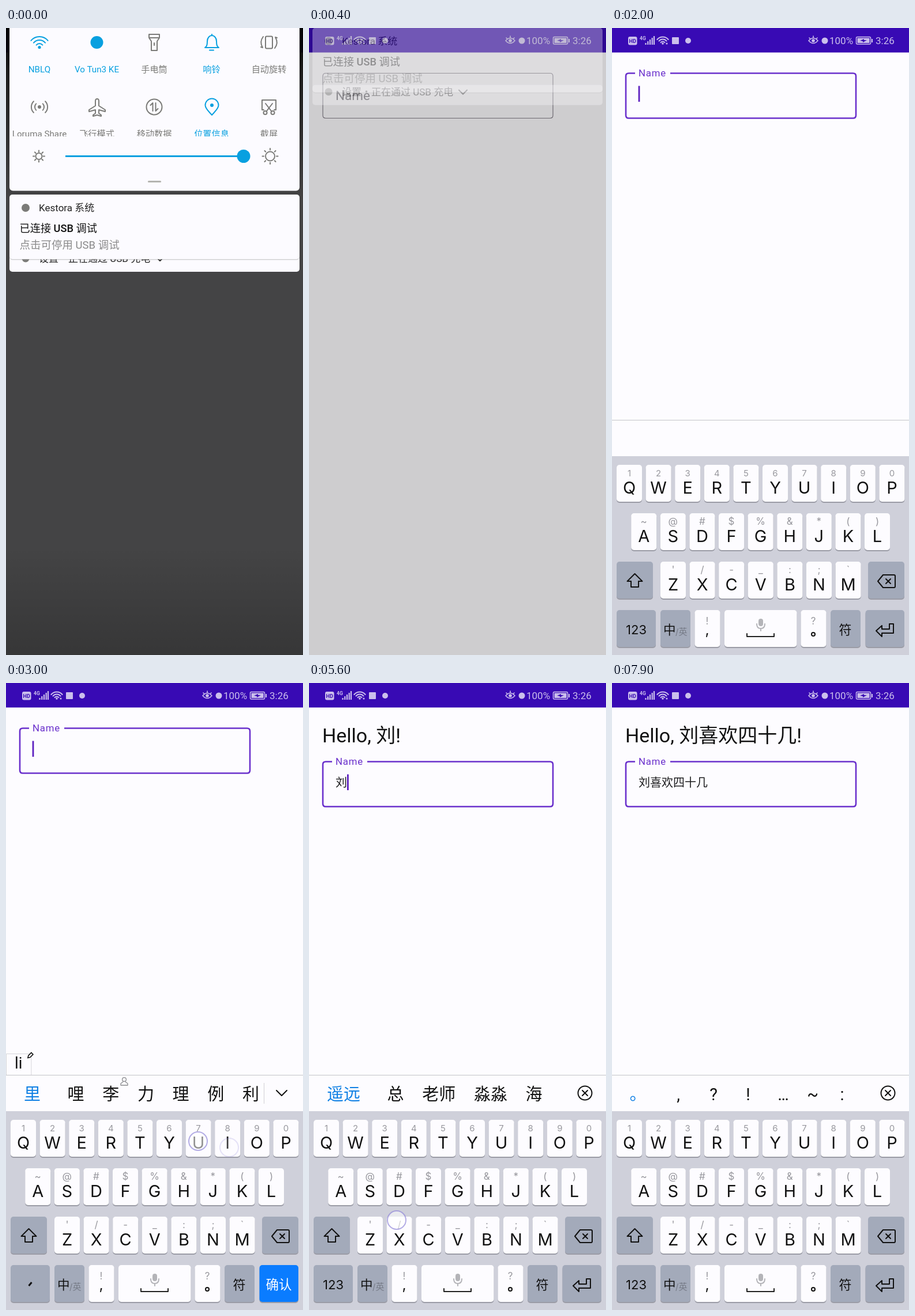
Animation, 515 px wide and 1088 px high, one loop 8000 ms. Source, as an HTML page:

```html
<!DOCTYPE html>
<html lang="zh-CN">
<head>
<meta charset="utf-8">
<title>Greeting form</title>
<style>
html, body { margin: 0; width: 100%; height: 100%; overflow: hidden; background: #fdfcff; }
svg { display: block; width: 100vw; height: 100vh; }
text { font-family: Roboto, "Noto Sans CJK SC", "Noto Sans CJK", sans-serif; white-space: pre; }
.mid { text-anchor: middle; }
.line { fill: none; stroke-width: 2; stroke-linecap: round; stroke-linejoin: round; }
.key text { font-family: Inter, "Noto Sans CJK SC", "Noto Sans CJK", sans-serif; }
.hint { fill: #98989e; }
#status text { fill: #cbbfec; font-size: 17px; }
#tiles text { font-size: 15.2px; text-anchor: middle; }
.g { stroke: #7b7b78; } .b { stroke: #08a0e0; }
.gt { fill: #7b7b78; } .bt { fill: #08a0e0; }
</style>
</head>
<body>
<svg viewBox="0 0 515 1088" preserveAspectRatio="none">
  <defs>
    <linearGradient id="topDark" x2="0" y2="1">
      <stop offset="0" stop-color="#000"/><stop offset=".25" stop-color="#000" stop-opacity=".6"/>
      <stop offset="1" stop-color="#000" stop-opacity="0"/>
    </linearGradient>
    <linearGradient id="lowDark" x2="0" y2="1">
      <stop offset="0" stop-color="#000" stop-opacity="0"/><stop offset="1" stop-color="#000" stop-opacity=".2"/>
    </linearGradient>
    <clipPath id="candClip"><rect y="681" width="446" height="62"/></clipPath>
  </defs>
  <rect width="515" height="1088" fill="#fdfcff"/>

  <g id="status">
    <rect width="515" height="42.5" fill="#380ab4"/>
    <rect x="28" y="15" width="15.5" height="14.5" rx="3" fill="#cbbfec"/>
    <text x="35.7" y="25.5" class="mid" style="font-size:9px;font-weight:700;fill:#380ab4">HD</text>
    <text x="48" y="20.5" style="font-size:8.5px;font-weight:700">4G</text>
    <path d="M58.5 29v-3M62.3 29v-6M66 29v-9M69.7 29v-12M73 29v-15" stroke="#cbbfec" stroke-width="2.2"/>
    <g id="statusWifi"></g>
    <rect x="104" y="16" width="12" height="12" rx="1" fill="#cbbfec"/>
    <circle cx="132" cy="22" r="5" fill="#cbbfec"/>
    <g class="line" stroke="#cbbfec">
      <path d="M341 22q8 -9 16 0q-8 9 -16 0zM342 17l2 2M349 14v3M356 17l-2 2" stroke-width="1.6"/>
    </g>
    <circle cx="349" cy="22" r="2.8" fill="#cbbfec"/>
    <circle cx="369" cy="22" r="5.5" fill="#cbbfec"/>
    <text x="377" y="28">100%</text>
    <rect x="423.5" y="15.5" width="25" height="12.5" rx="2" fill="none" stroke="#cbbfec" stroke-width="1.4"/>
    <rect x="425.5" y="17.5" width="21" height="8.5" fill="#cbbfec"/>
    <path d="M451 19v6" stroke="#cbbfec" stroke-width="2"/>
    <path d="M430 22l7 -3v2l5 0l-7 4v-2z" fill="#380ab4"/>
    <text x="457" y="28">3:26</text>
  </g>

  <text id="hello" x="23" y="103" font-size="34" fill="#111"></text>
  <g id="field">
    <path id="outline" fill="none"/>
    <text id="label" x="46">Name</text>
    <text id="value" x="46" y="122" font-size="20" fill="#1c1c1e"></text>
    <rect id="caret" y="100.5" width="2.8" height="27.5" fill="#5c1fc0"/>
  </g>

  <g id="keyboard">
    <g id="compose">
      <path id="composeBox" fill="#fdfcff" stroke="#d6d6da"/>
      <text id="pinyin" x="15" y="669" font-size="27.5" fill="#111"></text>
      <path id="pencil" d="M-4 4l1 -4l5 -5l3 3l-5 5z" fill="#fdfcff" stroke="#111" stroke-width="1.6"/>
    </g>
    <rect y="680" width="515" height="64" fill="#fdfcff"/>
    <path d="M0 680.5h515" stroke="#c4c4c8"/>
    <rect y="743" width="515" height="345" fill="#cfd0da"/>
    <g id="cands" clip-path="url(#candClip)" font-size="29"></g>
    <g id="person" class="line" stroke="#8a8a8e" style="stroke-width:1.3">
      <circle cx="205" cy="688" r="3.4"/><path d="M203 692l-4 3v3h12v-3l-4 -3"/>
    </g>
    <g id="more"><path d="M447.5 694v36" stroke="#d0d0d4"/><path class="line" d="M469 707l9 9l9 -9" stroke="#111"/></g>
    <g id="close" class="line" stroke="#111"><circle cx="478.500" cy="711.500" r="12"/><path d="M474 707l9 9M483 707l-9 9"/></g>
    <g id="keys" class="key"></g>
  </g>

  <g id="overlay">
    <rect id="scrim" width="515" height="1088"/>
    <g id="edges">
      <rect width="515" height="300" fill="url(#topDark)"/>
      <rect y="900" width="515" height="188" fill="url(#lowDark)"/>
    </g>
    <g id="shade">
      <g class="card">
        <rect x="6" y="388" width="503" height="35" rx="5" fill="#fcfbff"/>
        <circle cx="34" cy="400" r="6.500" class="gt"/>
        <text x="57" y="406" font-size="17" fill="#222">设置・正在通过 USB 充电</text>
        <path class="line" d="M260 397l7 7l7 -7" stroke="#222"/>
      </g>
      <g class="card">
        <rect x="6" y="290" width="503" height="112.5" rx="5" fill="#aaa" opacity=".5"/>
        <rect x="6" y="289" width="503" height="112" rx="5" fill="#fcfbff"/>
        <circle cx="34" cy="312" r="7" class="gt"/>
        <text x="57" y="318" font-size="17" fill="#222">Kestora 系统</text>
        <text x="23.500" y="354" font-size="18.200" font-weight="500" fill="#111">已连接 USB 调试</text>
        <text x="23.500" y="383" font-size="18.500" fill="#8a8a8a">点击可停用 USB 调试</text>
      </g>
      <rect x="6" y="-20" width="503" height="302.5" rx="6" fill="#fcfbff"/>
      <g id="tiles"></g>
      <path d="M103 222.500H412" stroke="#08a0e0" stroke-width="3"/>
      <circle cx="412" cy="222.500" r="11.500" fill="#08a0e0"/>
      <path class="line" d="M247.500 266.500h20" stroke="#b4b4b0" style="stroke-width:3.200"/>
    </g>
  </g>
  <g id="touches"></g>
</svg>

<script>
const $ = id => document.getElementById(id);
const LOOP = 8000, STEP = 100;
const clamp = v => Math.max(0, Math.min(1, v));
const mix = (a, b, p) => a + (b - a) * p;
const show = (el, on) => { el.style.display = on ? '' : 'none'; };
const text = (x, y, size, s, extra = '') => `<text x="${x}" y="${y}" font-size="${size}" ${extra}>${s}</text>`;
const path = (d, extra = '') => `<path class="line ${extra}" d="${d}"/>`;

// Icons
function wifi(x, y, radii) {
  return radii.map(r => `M${x - r * .77} ${y - r * .64}A${r} ${r} 0 0 1 ${x + r * .77} ${y - r * .64}`).join('');
}
function waves(x, y, radii) {
  return radii.map(r => [-1, 1].map(s =>
    `M${x + s * r * .72} ${y - r * .7}A${r} ${r} 0 0 ${s > 0 ? 1 : 0} ${x + s * r * .72} ${y + r * .7}`).join('')).join('');
}
function sun(x, y, r, a, b) {
  let d = '';
  for (let i = 0; i < 8; i++) {
    const c = Math.cos(i * Math.PI / 4), s = Math.sin(i * Math.PI / 4);
    d += `M${x + a * c} ${y + a * s}L${x + b * c} ${y + b * s}`;
  }
  return `<circle class="line g" cx="${x}" cy="${y}" r="${r}"/>` + path(d, 'g');
}

$('statusWifi').innerHTML = `<g stroke="#cbbfec">${path(wifi(88, 28, [4.5, 8.5, 12.5]))}</g>
  <circle cx="88" cy="27" r="1.8" fill="#cbbfec"/><circle cx="95" cy="27" r="1.5" fill="#cbbfec"/>`;

const labels = [['NBLQ', 'Vo Tun3 KE', '手电筒', '响铃', '自动旋转'],
                ['Loruma Share', '飞行模式', '移动数据', '位置信息', '截屏']];
const lit = [[0, 1, 3], [3]];
$('tiles').innerHTML =
  labels.map((row, r) => row.map((s, i) =>
    `<text x="${58 + 99.5 * i}" y="${r ? 188.5 : 77}" class="${lit[r].includes(i) ? 'bt' : 'gt'}">${s}</text>`).join('')).join('') +
  '<rect x="8" y="188" width="499" height="10" fill="#fcfbff"/>' +
  path(wifi(58, 34, [7, 13, 19]), 'b') + '<circle cx="58" cy="33.5" r="2.6" class="bt"/>' +
  '<circle cx="157.5" cy="25" r="11" class="bt"/>' +
  path('M248 11h18v6l-4 6v16h-10v-16l-4 -6zM248 17h18M257 26v4', 'g') +
  path('M345 34c3 -2 4 -4 4 -11c0 -6 4 -10 8 -10s8 4 8 10c0 7 1 9 4 11zM357 11v2M353 38.500h7', 'b') +
  path('M452 14.500h8a2 2 0 0 1 2 2v17a2 2 0 0 1 -2 2h-8a2 2 0 0 1 -2 -2v-17a2 2 0 0 1 2 -2z' +
       'M446 15q-7 9 -1 19l-3 -1M466 35q7 -9 1 -19l3 1', 'g') +
  path(waves(58, 137, [8, 14]), 'g') + '<circle cx="58" cy="137" r="3" class="gt"/>' +
  path('M158 123c2 0 3 2 3 4v8l11 7v3l-11 -3v6l4 3v2l-7 -2l-7 2v-2l4 -3v-6l-11 3v-3l11 -7v-8c0 -2 1 -4 3 -4z', 'g') +
  '<circle class="line g" cx="257" cy="137" r="13.5"/>' + path('M254.500 144v-14l-4 4M259.500 130v14l4 -4', 'g') +
  path('M357 151c-5 -6 -11.500 -11 -11.500 -17a11.500 11.500 0 0 1 23 0c0 6 -6.500 11 -11.500 17z', 'b') +
  '<circle cx="357" cy="134" r="3" class="bt"/>' +
  path('M447 142h-3v-17h24v17h-3M450 131l10 13M462 131l-10 13', 'g') +
  '<circle class="line g" cx="449.5" cy="147" r="3"/><circle class="line g" cx="462.5" cy="147" r="3"/>' +
  sun(57, 222.5, 5.5, 7.5, 10) + sun(458, 222.5, 8, 11, 13.5);

// Keyboard
const PITCH = 50.6;
const keyRect = (x, y, w, fill = '#fdfcff') =>
  `<rect x="${x}" y="${y + 2}" width="${w}" height="64" rx="5" fill="#9b9ca6"/>` +
  `<rect x="${x}" y="${y}" width="${w}" height="64" rx="5" fill="${fill}"/>`;
const FN = '#a3aaba';
const rows = [['QWERTYUIOP', '1234567890', 8, 758], ['ASDFGHJKL', '~@#$%&*()', 33.2, 842], ['ZXCVBNM', "'/-_:;`", 84, 926]];
let keys = '';
for (const [main, hints, x0, y] of rows)
  [...main].forEach((c, i) => {
    const x = x0 + PITCH * i, cx = x + 22;
    keys += keyRect(x, y, 44) +
      text(cx, y + 19.5, y === 758 ? 15 : 17, hints[i].replace('&', '&amp;'), 'class="mid hint"') +
      text(cx, y + 50, 29, c, 'class="mid" fill="#111"');
  });
const mid = 'class="mid" fill="#111"';
keys += keyRect(8, 926, 63, FN) + keyRect(444, 926, 63, FN) +
  '<g stroke="#111">' + path('M39.500 947l13 13h-6.500v10h-13v-10h-6.500z') +
  path('M470 949h19a2 2 0 0 1 2 2v18a2 2 0 0 1 -2 2h-19l-9 -11zM475 956l8 8M483 956l-8 8') + '</g>' +
  keyRect(8, 1010, 68, FN) + keyRect(84, 1010, 52, FN) + keyRect(143.500, 1010, 44) + keyRect(195, 1010, 125.500) +
  keyRect(327.500, 1010, 44) + keyRect(379, 1010, 52, FN) +
  text(89, 1052, 21.5, '中', 'fill="#111"') + text(110, 1053, 15, '/英', 'fill="#777c88"') +
  text(165, 1035, 17, '!', 'class="mid hint"') + text(165, 1053, 25, ',', mid) +
  text(349, 1035, 17, '?', 'class="mid hint"') + '<circle class="line" cx="349" cy="1052" r="3" stroke="#111"/>' +
  text(404.5, 1052, 22, '符', mid) +
  '<rect x="254" y="1025" width="8" height="13" rx="4" fill="#b4b4b8"/>' +
  '<g stroke="#b4b4b8">' + path('M251 1034q0 8 7 8t7 -8M258 1042v4') + '</g>' +
  '<g stroke="#222">' + path('M234 1051v5h47v-5') + '</g>' +
  `<g id="idleKeys">${text(42, 1051.5, 22, '123', mid)}${keyRect(439.5, 1010, 67.5, FN)}` +
  '<g stroke="#111">' + path('M458 1046l10 -9v6h13v-9h7v16h-20v6z') + '</g></g>' +
  '<g id="typeKeys"><path d="M39.500 1046l5 -6" stroke="#111" stroke-width="3"/>' +
  keyRect(439.500, 1010, 67.500, '#0a7cff') + text(473, 1052, 22.5, '确认', 'class="mid" fill="#fff"') + '</g>';
$('keys').innerHTML = keys;

// Input state over time: start, pinyin, candidates
const states = [
  [0, '', ''],
  [2500, 'l', '了 来 老 啦 两 里 路'],
  [2900, 'li', '里 哩 李 力 理 例 利'],
  [3100, 'liu', '刘 六 留 流 柳 溜 刘'],
  [4300, '', '遥远 总 老师 淼淼 海'],
  [5700, 'x', '想 小 下 新 先 学 向'],
  [5900, "x'h", '喜欢 学会 下化 小 想'],
  [6000, "x'h's", '喜欢上 信号 想 小'],
  [6100, "x'h'si", '喜欢四 虚线 想 小'],
  [6200, "x'h'si's", '喜欢四十 虚线 想 小'],
  [6300, "x'h'si's'j", '喜欢四十几 虚线 想 小'],
  [7100, '', '。 , ? ! … ~ :']
];
const punctX = [45, 115, 176, 236, 297, 348, 399];
const FOCUS = 1600, COMMIT1 = 4300, COMMIT2 = 7100;
const taps = [[1400, 73, 128], [2400, 462, 878], [2800, 387, 806], [3000, 333, 795], [4200, 48, 714],
  [5600, 152, 932], [5800, 308, 880], [5900, 107, 878], [6000, 385, 797], [6100, 108, 880], [6200, 358, 879], [7000, 96, 714]];

let current;
function setInput(state) {
  if (state === current) return;
  current = state;
  const [start, pinyin, list] = state;
  let x = 31;
  $('cands').innerHTML = (list ? list.split(' ') : []).map((w, i) => {
    const fill = `fill="${i ? '#111' : '#1080e4'}"`;
    if (start === COMMIT2) return text(punctX[i], 724, 29, w, `class="mid" ${fill}`);
    const out = text(x, 724, 29, w, fill);
    x += 29 * w.length + (i ? 31.7 : 46.5);
    return out;
  }).join('');
  show($('compose'), pinyin);
  show($('more'), pinyin);
  show($('typeKeys'), pinyin);
  show($('idleKeys'), !pinyin);
  show($('close'), !pinyin && list);
  show($('person'), pinyin === 'li');
  $('pinyin').textContent = pinyin;
  if (pinyin) {
    const right = 15 + $('pinyin').getComputedTextLength() + 15.5;
    $('composeBox').setAttribute('d', `M.5 681V643.500H${right}V681`);
    $('pencil').setAttribute('transform', `translate(${right - 2} 646.500)`);
  }
}

function setField(t) {
  const p = clamp((t - FOCUS + 100) / 200), eased = 1 - (1 - p) ** 2, on = t >= FOCUS;
  const name = t >= COMMIT2 ? '刘喜欢四十几' : t >= COMMIT1 ? '刘' : '';
  $('hello').textContent = name && `Hello, ${name}!`;
  $('value').textContent = name;
  $('field').setAttribute('transform', `translate(0 ${name ? 58 : 0})`);
  const outline = $('outline');
  outline.setAttribute('d', `M${on ? 101 : 40} 78.500H418q5 0 5 5V151.500q0 5 -5 5H29q-5 0 -5 -5V83.500q0 -5 5 -5H40`);
  outline.setAttribute('stroke', on ? '#6a30cc' : '#85808a');
  outline.setAttribute('stroke-width', on ? 2.6 : 1.2);
  const label = $('label');
  label.setAttribute('y', mix(125, 84, eased));
  label.setAttribute('font-size', mix(22.5, 16.8, eased));
  label.setAttribute('letter-spacing', .8 * eased);
  label.setAttribute('fill', on ? '#6a30cc' : '#68666c');
  const since = t >= COMMIT2 ? COMMIT2 : t >= COMMIT1 ? COMMIT1 : FOCUS;
  show($('caret'), on && (t - since) % 1000 < 500);
  $('caret').setAttribute('x', name ? 46 + 20 * name.length : 45.6);
}

function setShade(t) {
  const off = Math.min(440, t * .7233);
  show($('overlay'), off < 440);
  $('shade').setAttribute('transform', `translate(0 ${-off})`);
  $('scrim').setAttribute('opacity', .73 * clamp(1 - off / 390));
  $('edges').setAttribute('opacity', clamp(1 - t / 300));
  for (const card of document.querySelectorAll('.card')) card.setAttribute('opacity', clamp(1 - off / 430));
}

function draw(t) {
  setShade(t);
  setField(t);
  setInput(states.findLast(s => s[0] <= t));
  const up = clamp((t - 1700) / 300);
  show($('keyboard'), up > 0);
  $('keyboard').setAttribute('transform', `translate(0 ${408 * (1 - up) ** 2})`);
  $('touches').innerHTML = taps.filter(([s]) => t >= s && t < s + 300).map(([s, x, y]) =>
    `<circle cx="${x}" cy="${y}" r="16" fill="#fff" fill-opacity=".55" stroke="#8c82d8" stroke-opacity=".65"
      stroke-width="2" opacity="${1 - (t - s) / 300}"/>`).join('');
}

const begin = performance.now();
let last = -1;
function tick() {
  const t = Math.floor((performance.now() - begin) % LOOP / STEP) * STEP;
  if (t !== last) draw(last = t);
  requestAnimationFrame(tick);
}
tick();
</script>
</body>
</html>
```
